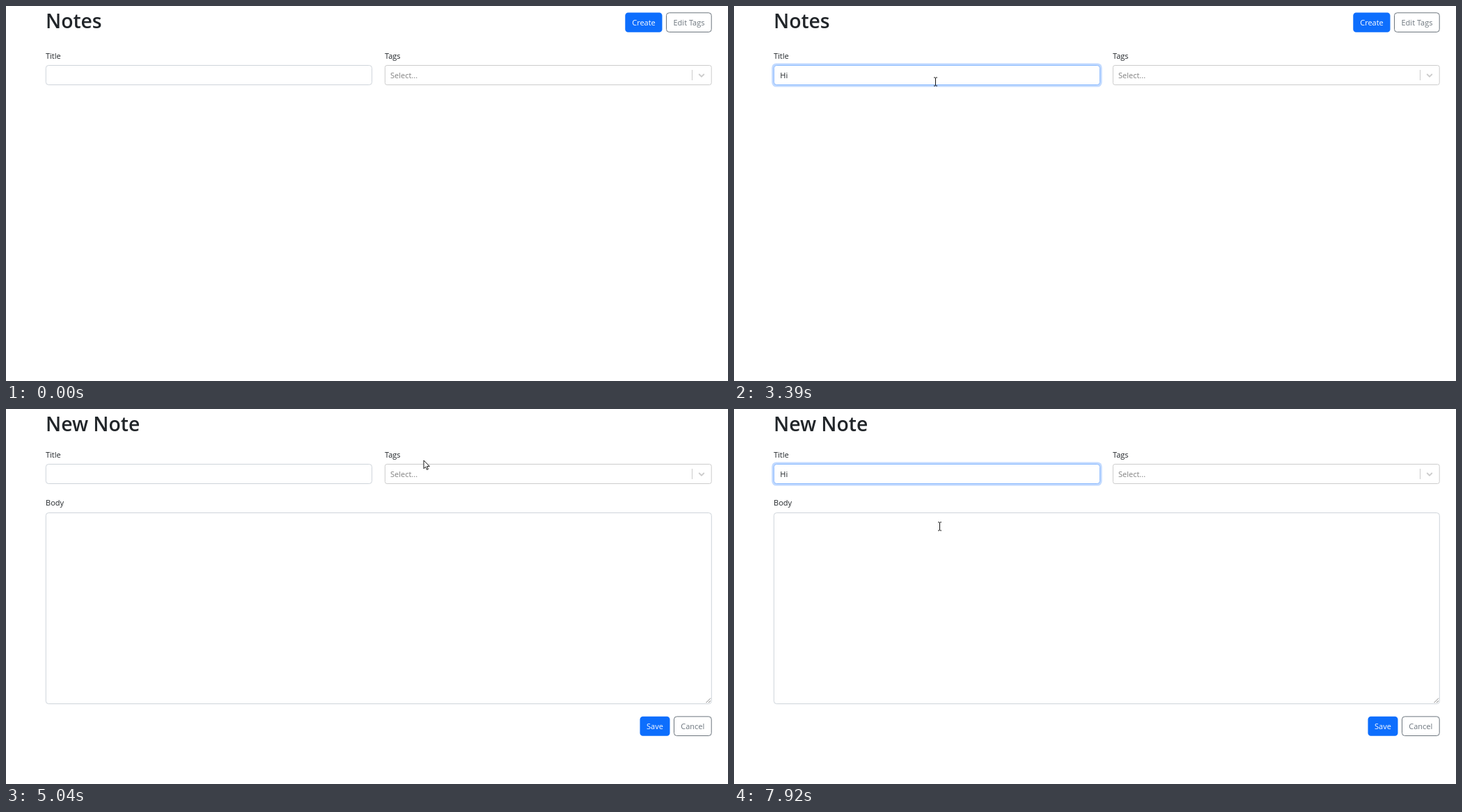
Recreate the animation shown at these times as an HTML page. Size 1037 px wide and 540 px high, loop 7.99 s.

```html
<!DOCTYPE html>
<html lang="en">
<head>
<meta charset="utf-8">
<title>Notes</title>
<style>
  html, body { margin: 0; width: 100%; height: 100%; overflow: hidden; background: #fff; }
  svg { display: block; width: 1037px; height: 540px; }
  text { font: 400 11px "Open Sans", "Noto Sans", sans-serif; fill: #212529; }
  .heading { font-size: 28.3px; font-weight: 600; }
  .mid { text-anchor: middle; }
  .light { fill: #fff; }
  .muted { fill: #6c757d; }
  .hint { fill: #808080; }
  .box { fill: #fff; stroke: #ced4da; }
  .select { fill: #fff; stroke: #ccc; }
  .outline { fill: #fff; stroke: #6c757d; }
  .primary { fill: #0d6efd; }
  .line { fill: none; stroke: #ccc; }
  .pointer { fill: #fff; stroke: #000; stroke-width: .9; stroke-linejoin: round; }
</style>
</head>
<body>
<svg viewBox="0 0 1037 540">
  <g id="list">
    <text class="heading" x="57" y="32">Notes</text>
    <rect id="create" data-pointer="hand" class="primary" x="889.3" y="9.5" width="53.2" height="28.3" rx="4.3"/>
    <text class="mid light" x="916" y="28">Create</text>
    <rect class="outline" x="948.5" y="9.8" width="64.7" height="27.7" rx="4"/>
    <text class="mid muted" x="981" y="28">Edit Tags</text>
  </g>
  <g id="editor">
    <text class="heading" x="57" y="32">New Note</text>
    <text x="57" y="138.5">Body</text>
    <rect data-pointer="beam" class="box" x="57.3" y="149.5" width="956" height="275" rx="4"/>
    <path d="M1005.5 423L1012 416.5M1009 423L1012 420" fill="none" stroke="#777" stroke-width=".9"/>
    <rect class="primary" x="910.5" y="442.7" width="43" height="28" rx="4.3"/>
    <text class="mid light" x="932" y="461">Save</text>
    <rect class="outline" x="959.5" y="442.9" width="53.7" height="27.6" rx="4"/>
    <text class="mid muted" x="986.3" y="461">Cancel</text>
  </g>
  <g id="fields">
    <text x="57" y="75.5">Title</text>
    <rect id="ring" x="54.2" y="82.4" width="474.4" height="34.2" rx="6.5" fill="#0d6efd"/>
    <rect id="input" data-pointer="beam" class="box" x="57.3" y="85.5" width="468.3" height="28" rx="4"/>
    <text id="typed" x="66.3" y="104"></text>
    <rect id="caret" y="91" width="1" height="16" fill="#111"/>
    <text x="544" y="75.5">Tags</text>
    <rect class="select" x="544.4" y="85.5" width="468.8" height="28" rx="2.8"/>
    <text class="hint" x="552" y="104">Select...</text>
    <path class="line" d="M985.5 92V107"/>
    <path class="line" d="M995.2 98L999 101.7 1002.8 98" stroke-width="1.8"/>
  </g>
  <g id="cursor">
    <path id="arrow" class="pointer" d="M0 0V11.8L2.7 9.3 4.5 13.4 6.4 12.6 4.6 8.6H8.3Z"/>
    <path id="beam" d="M-2 -6H-.3L.5 -5.4 1.3 -6H3M.5 -5.4V5.4M-2 6H-.3L.5 5.4 1.3 6H3" fill="none" stroke="#111"/>
    <path id="hand" class="pointer" d="M-1.3 10V.8Q-1.3 -.6 0 -.6T1.3 .8V5.2Q2.6 4.3 3.6 5.6 5 4.9 5.8 6.3 7.4 6 7.4 7.8V11.4Q7.2 13 6.2 14.4V16H-.4V14.6L-3.6 10Q-4.3 8.2 -2.8 8.1Z"/>
  </g>
</svg>
<script>
const LOOP = 7990, TICK = 66.583, LAST_TICK = 119, BLINK = 7.5;
const ENTER = 6, HOVER = 65, PRESS = 69, EDITOR_AT = 74;
const BLUE = [13, 110, 253], HOVERED = [11, 94, 215], PRESSED = [10, 88, 202];
const GREY = [206, 212, 218], FOCUSED = [134, 183, 254];

const entry = { x: 777, y: 499 };
const glides = [
  { from: 6, to: 8, x: 548, y: 354 },
  { from: 11, to: 13, x: 341, y: 113 },
  { from: 15, to: 20, x: 289, y: 123 },
  { from: 20, to: 24, x: 289, y: 109 },
  { from: 54, to: 63, x: 876, y: 27 },
  { from: 63, to: 68, x: 905, y: 25 },
  { from: 74, to: 85, x: 352, y: 113 },
  { from: 85, to: 90, x: 355, y: 104 },
  { from: 116, to: 119, x: 295, y: 169 }
];
const searching = { focus: 26, blur: PRESS, keys: [40, 43] };
const naming = { focus: 97, blur: Infinity, keys: [107, 111] };

const el = id => document.getElementById(id);
const show = (id, on) => { el(id).style.display = on ? "" : "none"; };
const fade = (n, start) => Math.max(0, Math.min(1, (n - start + 1) / 3));
const easeOut = p => 1 - (1 - p) ** 4;
const lerp = (a, b, p) => a + (b - a) * p;
const mix = (a, b, p) => `rgb(${a.map((v, i) => Math.round(lerp(v, b[i], p)))})`;

function pointerAt(n) {
  let { x, y } = entry;
  for (const g of glides) {
    if (n <= g.from) break;
    const p = easeOut(Math.min(1, (n - g.from) / (g.to - g.from)));
    x = lerp(x, g.x, p);
    y = lerp(y, g.y, p);
  }
  return [Math.round(x), Math.round(y)];
}

function pointerKind(x, y) {
  for (const zone of document.querySelectorAll("[data-pointer]")) {
    const r = zone.getBoundingClientRect();
    if (x >= r.left && x < r.right && y >= r.top && y < r.bottom) return zone.dataset.pointer;
  }
  return "arrow";
}

function drawInput(n, { focus, blur, keys }) {
  const pressed = keys.filter(k => k <= n);
  const typed = el("typed");
  typed.textContent = "Hi".slice(0, pressed.length);

  const glow = fade(n, focus) - fade(n, blur);
  el("ring").setAttribute("opacity", glow * .25);
  el("input").style.stroke = mix(GREY, FOCUSED, glow);

  // Each keystroke restarts the blinking.
  const restart = Math.max(focus, ...pressed);
  const lit = Math.floor((n - restart) / BLINK) % 2 === 0;
  show("caret", n >= focus && n < blur && lit);
  el("caret").setAttribute("x", Math.round(66 + typed.getComputedTextLength()));
}

function drawPointer(n) {
  const [x, y] = pointerAt(n);
  const kind = n < ENTER ? "" : pointerKind(x, y);
  for (const id of ["arrow", "beam", "hand"]) show(id, id === kind);
  el("cursor").setAttribute("transform", `translate(${x} ${y})`);
}

function draw(ms) {
  const n = Math.min(LAST_TICK, Math.floor((ms + 30) / TICK));
  const editing = n >= EDITOR_AT;
  show("list", !editing);
  show("editor", editing);
  el("fields").setAttribute("transform", `translate(0 ${editing ? -6 : 0})`);
  el("create").style.fill = n < PRESS
    ? mix(BLUE, HOVERED, fade(n, HOVER))
    : mix(HOVERED, PRESSED, fade(n, PRESS));
  drawInput(n, editing ? naming : searching);
  drawPointer(n);
}

const start = performance.now();
function loop() {
  draw((performance.now() - start) % LOOP);
  requestAnimationFrame(loop);
}
loop();
</script>
</body>
</html>
```
